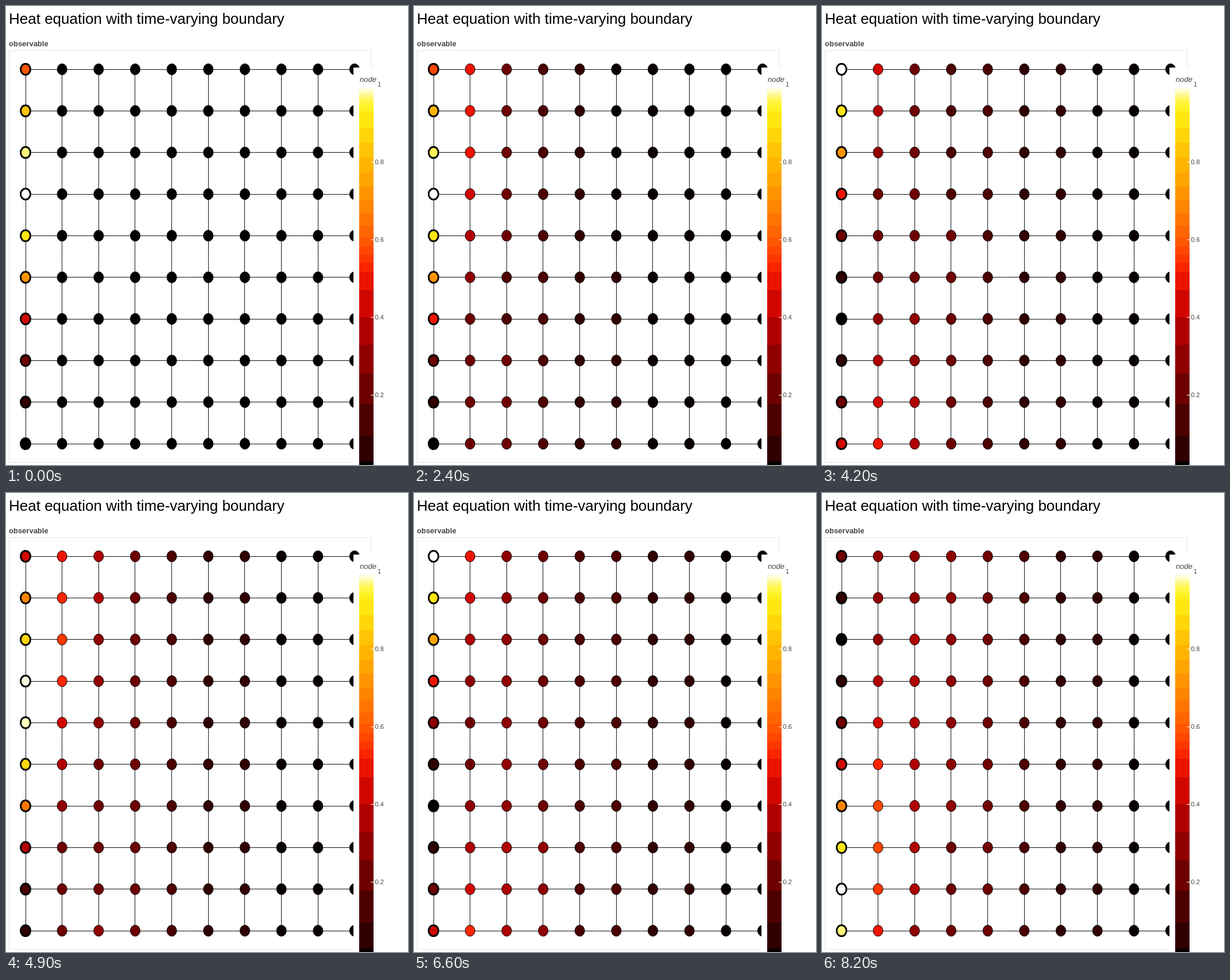
Write an HTML page with a canvas that moves like this. It is 700 px wide and 798 px high and loops after 8.3 s.

```html
<!DOCTYPE html>
<html lang="en">
<head>
<meta charset="utf-8">
<title>Heat equation</title>
<style>
  html, body { margin: 0; width: 100%; height: 100%; overflow: hidden; background: #fff; }
  canvas { display: block; }
</style>
</head>
<body>
<canvas id="stage" width="700" height="798"></canvas>
<script>
const ctx = document.getElementById('stage').getContext('2d');
const N = 10, STEPS = 83, STEP_MS = 100;
const DIFFUSION = 0.5, PHASE_STEP = 0.264, SUBSTEPS = 12;
const BAR_ZERO = 812, BAR_SCALE = 676;

// Upper edge of each colour band on the bar, hot to cold.
const BANDS = [
  [142, '#ffffff'], [147, '#ffffe0'], [151, '#ffffc0'], [155, '#fffaa0'],
  [160, '#fff77c'], [165, '#fff65a'], [172, '#fff540'], [179, '#fff42a'],
  [185, '#ffee1c'], [212, '#ffe70f'], [238, '#ffd60a'], [264, '#ffc405'],
  [290, '#ffb400'], [314, '#ffa500'], [338, '#ff9400'], [361, '#ff8500'],
  [382, '#ff7500'], [402, '#ff6500'], [418, '#ff5600'], [432, '#ff4700'],
  [446, '#fd3700'], [462, '#f92600'], [494, '#ec1400'], [541, '#d00700'],
  [589, '#b00000'], [639, '#900000'], [692, '#6e0000'], [747, '#4c0000'],
  [792, '#300000'], [809.3, '#080000'], [BAR_ZERO, '#000000']
];

const nodeX = i => 34 + 63.66 * i;
const nodeY = j => 761 - 72.33 * j;
const barY = v => BAR_ZERO - BAR_SCALE * v;
const boundary = (j, phase) => (1 - Math.cos(0.5 * j + phase)) / 2;

function heatColor(v) {
  const y = barY(v);
  return (BANDS.find(([edge]) => y < edge) || BANDS[BANDS.length - 1])[1];
}

// Left edge is driven, right edge is held at zero, top and bottom are insulated.
function solve() {
  let u = Array.from({ length: N }, () => new Float64Array(N));
  const drive = phase => u[0].forEach((_, j) => { u[0][j] = boundary(j, phase); });
  const dt = PHASE_STEP / SUBSTEPS;
  const states = [];
  drive(0);
  for (let s = 0; s < STEPS; s++) {
    states.push(u.map(col => col.slice()));
    for (let k = 1; k <= SUBSTEPS; k++) {
      u = u.map((col, i) => i === 0 || i === N - 1 ? col : col.map((v, j) => {
        const up = j < N - 1 ? col[j + 1] - v : 0;
        const down = j > 0 ? col[j - 1] - v : 0;
        return v + dt * DIFFUSION * (u[i - 1][j] + u[i + 1][j] - 2 * v + up + down);
      }));
      drive(s * PHASE_STEP + k * dt);
    }
  }
  return states;
}

function label(text, x, y, font, color = '#444') {
  ctx.font = font + ' "Liberation Sans", Arial, sans-serif';
  ctx.fillStyle = color;
  ctx.fillText(text, x, y);
}

function line(x1, y1, x2, y2) {
  ctx.beginPath();
  ctx.moveTo(x1, y1);
  ctx.lineTo(x2, y2);
  ctx.stroke();
}

function drawGrid(state) {
  ctx.strokeStyle = '#111';
  ctx.lineWidth = 1;
  for (let k = 0; k < N; k++) {
    const x = Math.floor(nodeX(k)) + 0.5, y = Math.floor(nodeY(k)) + 0.5;
    line(nodeX(0), y, nodeX(N - 1), y);
    line(x, nodeY(0), x, nodeY(N - 1));
  }
  ctx.strokeStyle = '#000';
  state.forEach((col, i) => col.forEach((v, j) => {
    ctx.beginPath();
    ctx.ellipse(nodeX(i), nodeY(j), 8.5, 9.6, 0, 0, 2 * Math.PI);
    ctx.fillStyle = heatColor(v);
    ctx.fill();
    ctx.lineWidth = i === 0 ? 3 : 1;
    ctx.stroke();
  }));
}

function drawBar() {
  ctx.fillStyle = '#fff';
  ctx.fillRect(605, 107, 95, 691);
  let top = 136;
  for (const [edge, color] of BANDS) {
    ctx.fillStyle = color;
    ctx.fillRect(615, top, 25, edge - top);
    top = edge;
  }
  label('node', 616, 132, 'italic 13px');
  label('1', 647, 140, '11px');
  ctx.strokeStyle = '#fff';
  ctx.lineWidth = 1;
  for (const v of [0.8, 0.6, 0.4, 0.2]) {
    const y = Math.floor(barY(v)) + 0.5;
    line(635, y, 640, y);
    label(v.toFixed(1), 642.5, Math.round(y + 3.5), '11px');
  }
}

const states = solve();

function draw(step) {
  ctx.fillStyle = '#fff';
  ctx.fillRect(0, 0, 700, 798);
  label('Heat equation with time-varying boundary', 5, 31, '26px', '#000');
  label('observable', 5, 70, 'bold 13px');
  ctx.strokeStyle = '#e5e5e5';
  ctx.lineWidth = 1;
  ctx.strokeRect(5.5, 77.5, 630, 716);
  drawGrid(states[step]);
  drawBar();
}

const start = performance.now();
let shown = -1;
function tick() {
  const step = Math.floor((performance.now() - start) / STEP_MS) % STEPS;
  if (step !== shown) draw(shown = step);
  requestAnimationFrame(tick);
}
tick();
</script>
</body>
</html>
```
